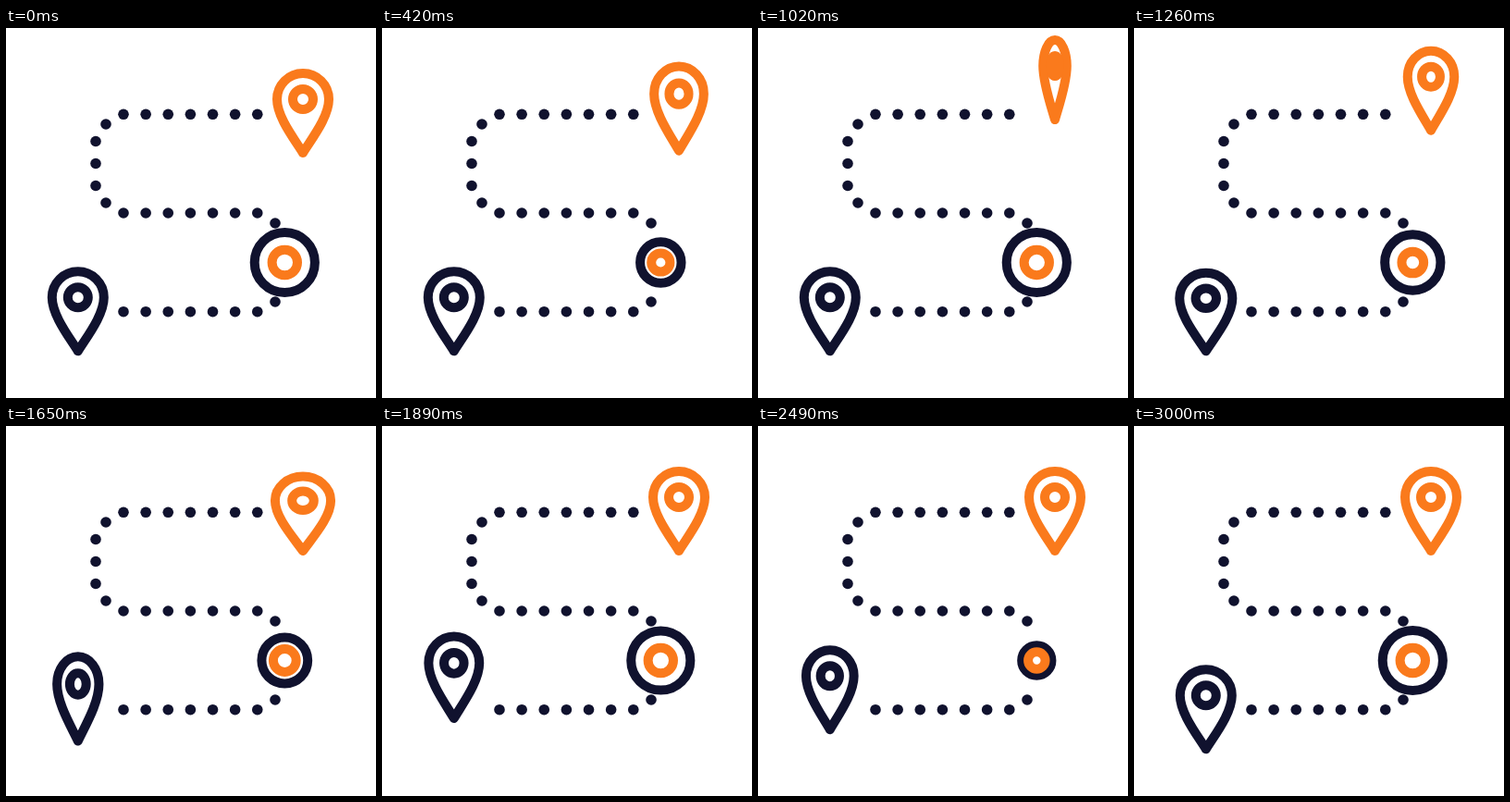
Animation of 400x400 px, one loop 5090 ms. Source, as an HTML page:

```html
<!DOCTYPE html>
<html lang="en">
<head>
<meta charset="utf-8">
<title>Route</title>
<style>
  html, body { margin: 0; height: 100%; overflow: hidden; background: #fff; }
  svg { display: block; width: 100%; height: 100%; }
  .line { fill: none; stroke-width: 10; stroke-linejoin: round; }
  .navy { stroke: #10122e; }
  .orange { stroke: #fa7a1c; }
  #dots { fill: #10122e; }
</style>
</head>
<body>
<svg viewBox="0 0 400 400">
  <g id="dots"></g>
  <circle id="halo" class="line navy" cx="301.3" cy="253.5"/>
  <circle id="core" class="line orange" cx="301.3" cy="253.5"/>
  <g id="goal" class="line orange"><path/><ellipse/></g>
  <g id="start" class="line navy"><path/><ellipse/></g>
</svg>
<script>
const LOOP = 5090, ACTIVE = 3000, STEP = 30;
const JUMP = 1800, HEIGHT = 36, LIFT_OFF = 410;
const byId = id => document.getElementById(id);
const clamp = v => Math.min(1, Math.max(0, v));
const progress = (t, from, to) => clamp((t - from) / (to - from));
const smooth = u => u * u * (3 - 2 * u);

// [time, width scale, height scale]
const SQUASH = [
  [0, 1, 1], [220, 1.106, .91], [430, .97, 1.06], [950, 1, 1],
  [1430, 1, 1], [1570, 1.106, .91], [JUMP, 1, 1]
];

function drawDots() {
  const dots = [[108, 104], [97, 122.5], [97, 146.5], [97, 170.5], [108, 189],
    [291, 211], [291, 296]];
  for (const y of [93.3, 200, 306.7])
    for (let i = 0; i < 7; i++) dots.push([127 + i * 24.13, y]);
  byId('dots').innerHTML =
    dots.map(([x, y]) => `<circle cx="${x}" cy="${y}" r="5.8"/>`).join('');
}

function squashAt(t) {
  const i = Math.max(1, SQUASH.findIndex(k => t <= k[0]));
  const a = SQUASH[i - 1], b = SQUASH[i];
  const u = smooth(progress(t, a[0], b[0]));
  return [a[1] + (b[1] - a[1]) * u, a[2] + (b[2] - a[2]) * u];
}

function liftAt(t) {
  const rise = 1 - (1 - progress(t, LIFT_OFF, 1000)) ** 4;
  const fall = progress(t, 990, 1430) ** 2.3;
  return HEIGHT * (rise - fall);
}

function spinAt(t) {
  if (t <= LIFT_OFF || t >= JUMP) return 1;
  const left = 1 - (t - LIFT_OFF) / 2070;
  return Math.abs(Math.cos(2 * Math.PI * left ** 5));
}

// The shape scales around its tip while the line keeps its weight.
function drawPin(id, x, y, time) {
  const t = Math.min(JUMP, Math.max(0, time));
  let [sx, sy] = squashAt(t);
  sx = Math.max(.01, sx * spinAt(t));
  const p = (px, py) => `${px * sx} ${py * sy} `;
  const pin = byId(id), [outline, ring] = pin.children;
  pin.setAttribute('transform', `translate(${x} ${y - liftAt(t)})`);
  outline.setAttribute('d', 'M0 0C' + p(-10, -16) + p(-28, -39) + p(-28, -58) +
    `A${p(28, 28)}0 0 1 ` + p(28, -58) + 'C' + p(28, -39) + p(10, -16) + '0 0Z');
  ring.setAttribute('cy', -58 * sy);
  ring.setAttribute('rx', 11 * sx);
  ring.setAttribute('ry', 11 * sy);
}

function drawPulse(t) {
  const u = (t % 1000) / 500;
  const shrink = (down, up) => u < 1 ? u ** down : (2 - u) ** up;
  byId('halo').setAttribute('r', 32.6 - 17.5 * shrink(3, 2.3));
  byId('core').setAttribute('r', 13.7 - 4.6 * shrink(1.4, 3.5));
}

function draw(now) {
  const t = Math.min(ACTIVE, Math.floor((now % LOOP) / STEP) * STEP);
  drawPulse(t);
  drawPin('goal', 321, 135, t);
  drawPin('start', 77.8, 349.3, t - 1200);
}

function frame() {
  draw(performance.now() - begin);
  requestAnimationFrame(frame);
}

drawDots();
const begin = performance.now();
frame();
</script>
</body>
</html>
```
